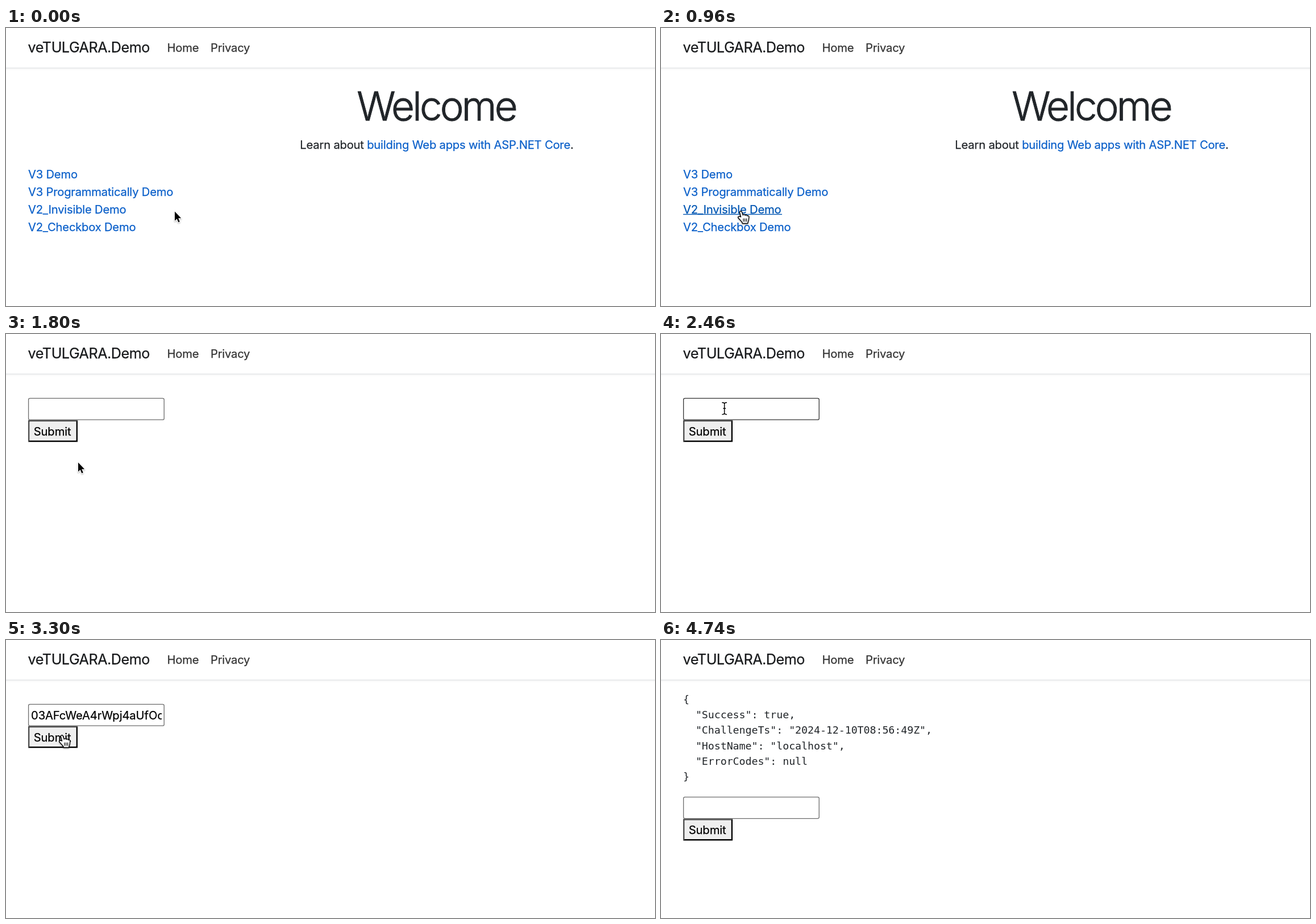
Write an HTML page that moves like this. It is 1142x490 px and loops after 4800 ms.

```html
<!DOCTYPE html>
<html lang="en">
<head>
<meta charset="utf-8">
<title>Demo</title>
<style>
  html, body { margin: 0; width: 100%; height: 100%; overflow: hidden; background: #fff; }
  svg { display: block; }
  text {
    font: 400 20.2px Inter, "Liberation Sans", sans-serif;
    font-optical-sizing: none;
    letter-spacing: -.01em;
    white-space: pre;
    color: #212529;
    fill: currentColor;
    stroke: currentColor;
    stroke-width: .25;
  }
  .brand { font-size: 25.2px; letter-spacing: -.02em; color: #181a1c; }
  .nav { color: #333; }
  .title { font-size: 70.6px; font-weight: 300; letter-spacing: -.053em; stroke-width: .9; }
  .mid { text-anchor: middle; }
  .link { color: #0a5fc9; }
  .link.hover { color: #0056b3; }
  .code text { font: 18.2px "DejaVu Sans Mono", monospace; letter-spacing: 0; stroke: none; }
  .field { fill: #fff; stroke: #6c6c6c; stroke-width: 1.3; }
  .field.hover { stroke: #333; }
  .form text { color: #000; letter-spacing: -.005em; }
  .off { opacity: .3; }
  .cursor path { stroke-linejoin: round; stroke-linecap: round; }
</style>
</head>
<body>
<svg width="1142" height="490" viewBox="0 0 1142 490">
  <defs>
    <linearGradient id="shade" x2="0" y2="1">
      <stop stop-opacity=".04"/>
      <stop offset="1" stop-opacity="0"/>
    </linearGradient>
    <clipPath id="inner"><rect x="43" y="115" width="231" height="35"/></clipPath>
    <filter id="soft" x="-50%" y="-50%" width="200%" height="200%">
      <feDropShadow dx="0" dy="1.5" stdDeviation="1.2" flood-opacity=".3"/>
    </filter>
    <path id="bar" d="M-4.3-10.5C-1.5-10.5 0-10 0-8V8C0 10-1.5 10.5-4.3 10.5M4.3-10.5C1.5-10.5 0-10 0-8M0 8C0 10 1.5 10.5 4.3 10.5M-2.3 0H2.3"/>
  </defs>

  <rect y="70" width="1142" height="1" fill="#dcdfe2"/>
  <rect y="71" width="1142" height="4" fill="url(#shade)"/>
  <text class="brand" x="38.5" y="43">veTULGARA.Demo</text>
  <text class="nav" x="283.5" y="41.5">Home</text>
  <text class="nav" x="360" y="41.5">Privacy</text>

  <g id="home">
    <text class="title mid" x="757" y="163">Welcome</text>
    <text class="mid" x="758" y="212.5">Learn about <tspan class="link">building Web apps with ASP.NET Core</tspan>.</text>
    <text class="link" x="39" y="264.5">V3 Demo</text>
    <text class="link" x="39" y="295.6">V3 Programmatically Demo</text>
    <text class="link" id="invisible" x="39" y="326.8">V2_Invisible Demo</text>
    <rect id="underline" x="39" y="327.8" width="174" height="1.4" fill="#0056b3"/>
    <text class="link" x="39" y="358">V2_Checkbox Demo</text>
  </g>

  <g id="result" class="code">
    <text x="39" y="110.5">{</text>
    <text x="39" y="138">  "Success": true,</text>
    <text x="39" y="165.3">  "ChallengeTs": "2024-12-10T08:56:49Z",</text>
    <text x="39" y="192.6">  "HostName": "localhost",</text>
    <text x="39" y="219.9">  "ErrorCodes": null</text>
    <text x="39" y="247.2">}</text>
  </g>

  <g id="form" class="form">
    <rect id="field" class="field" x="39.6" y="113.4" width="238.6" height="37.8" rx="2.5"/>
    <g clip-path="url(#inner)"><text id="token" x="44" y="139.7">03AFcWeA4rWpj4aUfOcT</text></g>
    <g id="button">
      <path d="M39 151.8H126L123.4 154.4H41.6V187.6L39 190.2Z" fill="#4c4c4c"/>
      <path d="M126 151.8V190.2H39L41.6 187.6H123.4V154.4Z"/>
      <rect x="41.6" y="154.4" width="81.8" height="33.2" fill="#efefef"/>
      <text x="48.7" y="179">Submit</text>
    </g>
  </g>

  <circle id="ring" fill="none" stroke="#4889e9" stroke-opacity=".48"/>

  <g id="cursor" class="cursor">
    <g id="arrow" filter="url(#soft)">
      <path d="M0 0V16.2L3.7 12.8L6.3 18.9L8.8 17.8L6.2 11.8H11.2Z" stroke="#fff" stroke-width="2" paint-order="stroke"/>
    </g>
    <g id="hand" filter="url(#soft)" stroke="#000" stroke-width="1.4">
      <path d="M-1.5 10L-3.5 2.5C-4.2-.2-.6-1.4 .3 1.4L2.3 7C2.6 5.2 5.6 5 6 7.4C6.8 5.8 9.3 6.2 9.5 8.2C10.5 7.2 12.8 7.8 12.8 10C12.8 15 12 17 10.5 21.5H1.5C.5 18-3 15.5-6 11.8C-7.5 9.5-4.5 8-1.5 10Z" fill="#fff"/>
      <path d="M3 13V18M5.8 13V18M8.6 13V18" stroke-width="1.2"/>
    </g>
    <g id="beam" fill="none">
      <use href="#bar" stroke="#fff" stroke-width="3.2" stroke-opacity=".8"/>
      <use href="#bar" stroke="#000" stroke-width="1.5"/>
    </g>
  </g>
</svg>
<script>
  const LOOP = 4800, STEP = 60;
  const FORM_AT = 1200, RESULT_AT = 3540, LEAVE_AT = 4320;
  const BUSY_AT = 3000, TOKEN_AT = 3240;

  const $ = id => document.getElementById(id);
  const show = (id, on) => { $(id).style.display = on ? "" : "none"; };
  const easeInOut = p => p < .5 ? 2 * p * p : 1 - 2 * (1 - p) ** 2;
  const easeIn = p => p ** 1.4;

  // start, end, destination, easing
  const start = [297, 323.5];
  const moves = [
    [0, 780, [142, 323], easeInOut],
    [1500, 2100, [112, 130], easeInOut],
    [2400, 2880, [100, 168], easeInOut],
    [4020, LEAVE_AT, [392, 495], easeIn],
  ];
  const clicks = [[1020, 142, 323], [2940, 100, 168]];

  function pointerAt(t) {
    let [x, y] = start;
    for (const [from, to, end, ease] of moves) {
      if (t <= from) break;
      const p = ease(Math.min(1, (t - from) / (to - from)));
      x += (end[0] - x) * p;
      y += (end[1] - y) * p;
    }
    return [x, y];
  }

  function drawRing(t) {
    const click = clicks.find(([at]) => t >= at && t < at + 360);
    show("ring", click);
    if (!click) return;
    const [at, x, y] = click, n = (t - at) / STEP;
    const attrs = {
      cx: x, cy: y,
      r: 22 + 5.9 * n - .23 * n * n,
      "stroke-width": Math.max(.5, 5 - n),
    };
    for (const key in attrs) $("ring").setAttribute(key, attrs[key]);
  }

  function draw(t) {
    const home = t < FORM_AT, result = t >= RESULT_AT;
    const [x, y] = pointerAt(t);
    const shift = result ? 163.4 : 0;
    const within = (l, top, r, bottom) => x >= l && x <= r && y >= top && y <= bottom;

    const onLink = home && within(39, 308, 213, 332);
    const onField = !home && within(39, 113 + shift, 278, 152 + shift);
    const onButton = !home && within(39, 152 + shift, 126, 191 + shift);
    const onCode = result && within(39, 90, 1100, 254);
    const hand = onLink || onButton, beam = onField || onCode;

    show("home", home);
    show("form", !home);
    show("result", result);
    show("token", t >= TOKEN_AT && !result);
    show("underline", onLink);
    $("form").setAttribute("transform", `translate(0 ${shift})`);
    $("invisible").classList.toggle("hover", onLink);
    $("field").classList.toggle("hover", onField);
    $("button").classList.toggle("off", t >= BUSY_AT && t < TOKEN_AT);

    show("cursor", t < LEAVE_AT);
    show("hand", hand);
    show("beam", beam);
    show("arrow", !hand && !beam);
    $("cursor").setAttribute("transform", `translate(${x} ${y})`);
    drawRing(t);
  }

  const began = performance.now();
  function tick() {
    const t = Math.max(0, performance.now() - began) % LOOP;
    draw(Math.floor(t / STEP) * STEP);
    requestAnimationFrame(tick);
  }
  tick();
</script>
</body>
</html>
```
